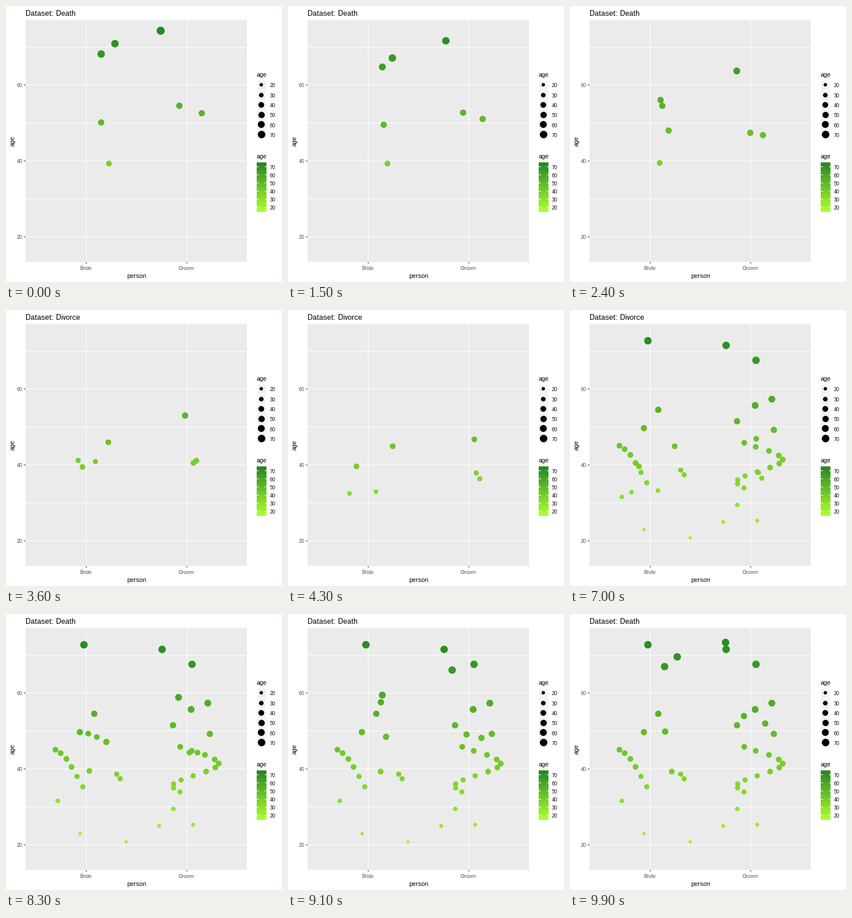
Recreate the animation shown at these times as a matplotlib script. Size 480x480 px, loop 10000 ms.

```python
import numpy as np
import matplotlib.pyplot as plt
from matplotlib.animation import FuncAnimation
from matplotlib.colors import to_rgb
from matplotlib.patches import Rectangle

plt.rcParams.update({
    "font.family": "Liberation Sans",
    "text.hinting": "native",
    "text.hinting_factor": 1,
    "toolbar": "None",
})

SIDE, DPI = 480, 96
PT = 72 / DPI                      # points per pixel
FRAMES, STEP = 100, 100
AGE_MIN, AGE_MAX = 16.27, 74.25
SPAN = AGE_MAX - AGE_MIN
TOP, PER_YEAR = 43.1, 6.6          # pixel row of the oldest age, pixels per year

# ---- points ---------------------------------------------------------------

# Moving points: x, y for "Death", then for "Divorce"
MOVES = np.array([
    (165, 84, 150, 368), (189, 66, 88, 376), (165, 203, 186, 245),
    (179, 274, 106, 272), (269, 43, 337, 266), (301, 174, 341, 320),
    (340, 187, 325, 305),
], float)
DEATH, DIVORCE = MOVES[:, :2], MOVES[:, 2:]

# Outlying points seen in "Divorce" only
OUTER = [
    (135, 54), (153, 174), (128, 206), (192, 279), (198, 287), (90, 325),
    (129, 382), (209, 396), (271, 62), (323, 88), (351, 155), (322, 166),
    (290, 194), (354, 209), (291, 339), (266, 369), (325, 367),
]


def bride_crowd(n=6):
    t = np.linspace(0, 1, n)
    return np.stack([86 + 47 * t, 236 + 65 * t ** 1.5], axis=1)


def groom_crowd(n=12):
    t = np.arange(n)
    x = 330 + 40 * np.sin(2 * np.pi * (t - 1.3) / (n - 1))
    return np.stack([x, np.linspace(231, 310, n)], axis=1)


EXTRA = np.vstack([OUTER, bride_crowd(), groom_crowd()])

# ---- scales ---------------------------------------------------------------

TO_XYZ = np.array([[0.4124, 0.3576, 0.1805],
                   [0.2126, 0.7152, 0.0722],
                   [0.0193, 0.1192, 0.9505]])
WHITE = TO_XYZ.sum(axis=1)


def rgb_to_lab(rgb):
    c = np.asarray(rgb)
    lin = np.where(c > 0.04045, ((c + 0.055) / 1.055) ** 2.4, c / 12.92)
    t = TO_XYZ @ lin / WHITE
    f = np.where(t > 0.008856, np.cbrt(t), 7.787 * t + 16 / 116)
    return np.array([116 * f[1] - 16, 500 * (f[0] - f[1]), 200 * (f[1] - f[2])])


def lab_to_rgb(lab):
    fy = (lab[:, 0] + 16) / 116
    f = np.stack([fy + lab[:, 1] / 500, fy, fy - lab[:, 2] / 200], axis=1)
    xyz = np.where(f > 0.2069, f ** 3, (f - 16 / 116) / 7.787) * WHITE
    lin = np.clip(xyz @ np.linalg.inv(TO_XYZ).T, 0, 1)
    return np.where(lin > 0.0031308, 1.055 * lin ** (1 / 2.4) - 0.055, 12.92 * lin)


LOW, HIGH = (rgb_to_lab(to_rgb(c)) for c in ("greenyellow", "forestgreen"))


def share(age):
    return np.clip((np.asarray(age, float) - AGE_MIN) / SPAN, 0, 1)


def age_color(age):
    return lab_to_rgb(LOW + (HIGH - LOW) * share(age)[:, None])


def age_at(y):
    return AGE_MAX - (y - TOP) / PER_YEAR


def age_size(age):
    return 1 + 5 * np.sqrt(share(age))


def diameter(size):
    return np.floor(0.75 * (size * 2.845 + 0.945) + 0.5)


def snap(xy, diam):
    """Put the edges of each dot on whole pixels."""
    half = diam[:, None] / 2
    return np.floor(xy - half + [0.5, 0.49]) + half


# ---- fixed parts ----------------------------------------------------------

fig = plt.figure(figsize=(SIDE / DPI, SIDE / DPI), dpi=DPI, facecolor="white")
ax = fig.add_axes([0, 0, 1, 1])
ax.axis("off")


def box(x, y, w, h, color, z=1):
    ax.add_patch(Rectangle((x, y), w, h, facecolor=color, linewidth=0,
                           antialiased=False, zorder=z))


def label(x, y, s, px, color="black", ha="left", **kw):
    return ax.text(x, y, s, fontsize=px * PT, color=color, ha=ha,
                   va="baseline", zorder=6, **kw)


def dots(xy, sizes, colors, z):
    diam = diameter(sizes)
    pos = snap(xy, diam)
    return ax.scatter(pos[:, 0], pos[:, 1], s=(diam * PT) ** 2, c=colors,
                      linewidths=0, zorder=z)


def draw_panel():
    box(34, 24, 385, 421, "#EBEBEB")
    for y in (71, 203, 335):
        box(34, y, 385, 1, "white", 2)
    for age in (60, 40, 20):
        y = int(TOP + (AGE_MAX - age) * PER_YEAR)
        box(34, y, 385, 1, "white", 2)
        box(31, y, 3, 1, "#333333", 2)
        label(29, y + 4, str(age), 9, "#4D4D4D", "right")
    for x, who in ((139, "Bride"), (314, "Groom")):
        box(x, 24, 1, 421, "white", 2)
        box(x, 445, 1, 3, "#333333", 2)
        label(x, 459, who, 9, "#4D4D4D", "center")
    label(227, 473, "person", 11, ha="center")
    label(15, 235, "age", 11, rotation=90, rotation_mode="anchor", ha="center")


def draw_size_legend():
    label(436, 123, "age", 11)
    ages = np.arange(20, 71, 10)
    rows = 137.3 + 17.28 * np.arange(len(ages))
    box(437, 130, 15, 102, "#F2F2F2")
    for y, age in zip(rows, ages):
        box(436, int(y - 8.24), 17, 1, "white", 2)
        label(459, round(y + 4.1), str(age), 9)
    xy = np.stack([np.full(len(ages), 444.3), rows], axis=1)
    dots(xy, age_size(ages), "black", 5)


def draw_color_legend():
    label(436, 265, "age", 11)
    mid = np.arange(86) + 0.5
    ramp = age_color(AGE_MAX - (mid - 2.16) / 82.08 * SPAN)
    ax.imshow(ramp[:, None, :], extent=(436, 453, 358, 272), aspect="auto",
              interpolation="nearest", zorder=2)
    for age in range(20, 71, 10):
        y = 274.16 + (AGE_MAX - age) / SPAN * 82.08
        box(436, int(y - 0.5), 4, 1, "white", 3)
        box(450, int(y - 0.5), 3, 1, "white", 3)
        label(459, round(y + 3.5), str(age), 9)


draw_panel()
draw_size_legend()
draw_color_legend()
title = label(34, 17, "", 13)

extra_ages = age_at(EXTRA[:, 1])
extra = dots(EXTRA, age_size(extra_ages), age_color(extra_ages), 4)

size_from, size_to = (age_size(age_at(s[:, 1])) for s in (DEATH, DIVORCE))
moving = dots(DEATH, size_from, age_color(age_at(DEATH[:, 1])), 5)

ax.set_xlim(0, SIDE)
ax.set_ylim(SIDE, 0)


# ---- motion ---------------------------------------------------------------

def progress(i):
    """0 is Death, 1 is Divorce; linear between the two rests."""
    return float(np.interp(i, [12, 50, 63, 100], [0, 1, 1, 0]))


def update(i):
    p = progress(i)
    xy = DEATH + (DIVORCE - DEATH) * p
    diam = diameter(size_from + (size_to - size_from) * p)
    moving.set_offsets(snap(xy, diam))
    moving.set_sizes((diam * PT) ** 2)
    moving.set_facecolors(age_color(age_at(xy[:, 1])))
    extra.set_visible(i >= 50)
    title.set_text("Dataset: " + ("Divorce" if p >= 0.5 else "Death"))
    return moving, extra, title


anim = FuncAnimation(fig, update, frames=FRAMES, interval=STEP,
                     init_func=lambda: update(0), repeat=True,
                     repeat_delay=0, blit=False)
plt.show()
```
